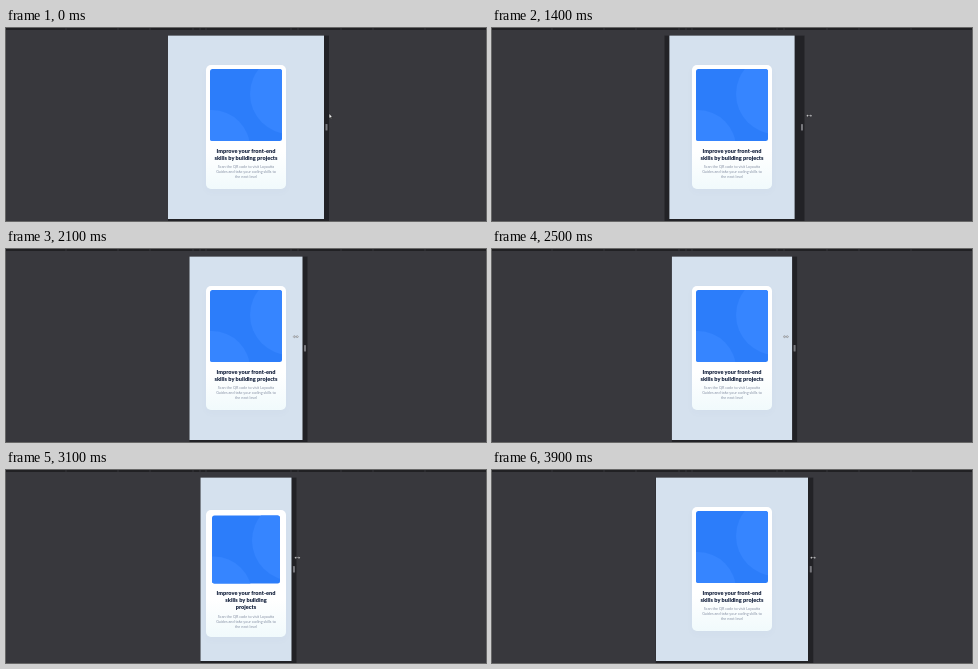
Animation, 480 px wide and 193 px high, one loop 4000 ms. Source, as an HTML page:

```html
<!DOCTYPE html>
<html lang="en">
<head>
<meta charset="utf-8">
<title>Responsive card resize</title>
<style>
  html, body { margin: 0; height: 100%; overflow: hidden; background: #38383d; }
  svg { display: block; width: 100vw; height: 100vh; }
  text { font-family: Lato, sans-serif; text-anchor: middle; }
  .heading { font-size: 5.6px; font-weight: 900; fill: #14213d; }
  .body { font-size: 3.75px; fill: #8791a5; }
  .card { filter: drop-shadow(0 3px 3px rgba(40, 70, 110, .02)); }
</style>
</head>
<body>
<svg viewBox="0 0 480 193">
  <defs>
    <linearGradient id="paper" x2="0" y2="1">
      <stop offset=".7" stop-color="#fff"/>
      <stop offset="1" stop-color="#f1fafc"/>
    </linearGradient>
    <clipPath id="wideImage"><rect x="204" y="41" width="72" height="72" rx="2.5"/></clipPath>
    <clipPath id="narrowImage"><rect x="206" y="45.5" width="68" height="68" rx="2.5"/></clipPath>
  </defs>

  <rect width="480" height="193" fill="#38383d"/>
  <rect width="480" height="2" fill="#212124"/>
  <path d="M60 0v2M112 0v2M144 0v2M187 0v2M194 0v2M200 0v2M285 0v2M292 0v2M335 0v2M367 0v2M419 0v2" stroke="#3c3c40" stroke-width=".8"/>

  <rect id="frame" y="7.6" height="185.4" fill="#222226"/>
  <rect id="page" y="7.6" height="183.4" fill="#d5e1ee"/>
  <rect id="handle" y="96" width="2" height="6.5" rx=".6" fill="#78787d"/>

  <g id="wide"></g>
  <g id="narrow"></g>

  <path id="pointer" d="M323.2 85.8v4.4l1.1-1 .7 1.4.7-.4-.7-1.3h1.3z" fill="#fff" stroke="#111" stroke-width=".4"/>
  <path id="resizer" d="M-2.9 0l1.7-1.2v.9h2.4v-.9l1.7 1.2-1.7 1.2V.3h-2.4v.9z" fill="#e4e4e8" stroke="#333" stroke-width=".25"/>
</svg>
<script>
const LOOP = 4000, STEP = 100, CENTER = 240;
const NARROW_BELOW = 47;   // half page width at the layout breakpoint

// Turning points of the drag: [time, half page width]
const turns = [
  [0, 78], [300, 78], [695, 42], [1000, 73], [1275, 45], [1500, 75], [1730, 39.6],
  [2000, 68], [2200, 45], [2450, 63], [2640, 45], [2900, 93], [3125, 44],
  [3330, 78], [3600, 45], [3900, 76], [4000, 78]
];

const byId = id => document.getElementById(id);
const set = (id, attrs) => {
  for (const name in attrs) byId(id).setAttribute(name, attrs[name]);
};
const show = (id, visible) => byId(id).style.display = visible ? "" : "none";

function halfWidth(time) {
  const t = Math.min(time, LOOP);
  const next = Math.max(1, turns.findIndex(([at]) => at >= t));
  const [t0, a] = turns[next - 1], [t1, b] = turns[next];
  return a + (b - a) * (1 - Math.cos(Math.PI * (t - t0) / (t1 - t0))) / 2;
}

function textLines(className, lines, baseline, leading) {
  return lines.map((line, i) =>
    `<text class="${className}" x="${CENTER}" y="${baseline + i * leading}">${line}</text>`).join("");
}

function buildCard(id, top, height, image, heading, bodyBaseline) {
  const body = ["Scan the QR code to visit Layoutia", "Guides and take your coding skills to", "the next level"];
  byId(id).innerHTML = `
    <rect class="card" x="200" y="${top}" width="80" height="${height}" rx="5" fill="url(#paper)"/>
    <g clip-path="url(#${id}Image)">
      <rect x="200" y="40" width="80" height="76" fill="#2c7dfa"/>
      <circle cx="${image.left + 80}" cy="${image.top + 25}" r="40" fill="#3685ff"/>
      <circle cx="${image.left + 2}" cy="${image.top + 79}" r="38" fill="#3685ff"/>
    </g>` +
    textLines("heading", heading, image.baseline, 7) +
    textLines("body", body, bodyBaseline, 5);
}

buildCard("wide", 37, 124, { left: 204, top: 41, baseline: 124.7 },
  ["Improve your front-end", "skills by building projects"], 140.4);
buildCard("narrow", 40, 127, { left: 206, top: 45.5, baseline: 125 },
  ["Improve your front-end", "skills by building", "projects"], 147.6);

function draw(t) {
  const half = halfWidth(t);
  // The frame runs ahead of the page while it grows; the cursor leads both.
  const frameHalf = Math.max(half, halfWidth(t + 25));
  const cursorX = CENTER + halfWidth(t + 70) + 3.5;

  set("frame", { x: CENTER - frameHalf, width: 2 * frameHalf + 5 });
  set("page", { x: CENTER - half, width: 2 * half });
  set("handle", { x: CENTER + frameHalf + 1.5 });
  set("resizer", { transform: `translate(${cursorX} 87.7)` });

  const narrow = half < NARROW_BELOW;
  show("wide", !narrow);
  show("narrow", narrow);
  show("pointer", t < 200);
  show("resizer", t >= 200);
}

const start = performance.now();
function tick() {
  const t = (performance.now() - start) % LOOP;
  draw(Math.floor(t / STEP) * STEP);
  requestAnimationFrame(tick);
}
tick();
</script>
</body>
</html>
```
